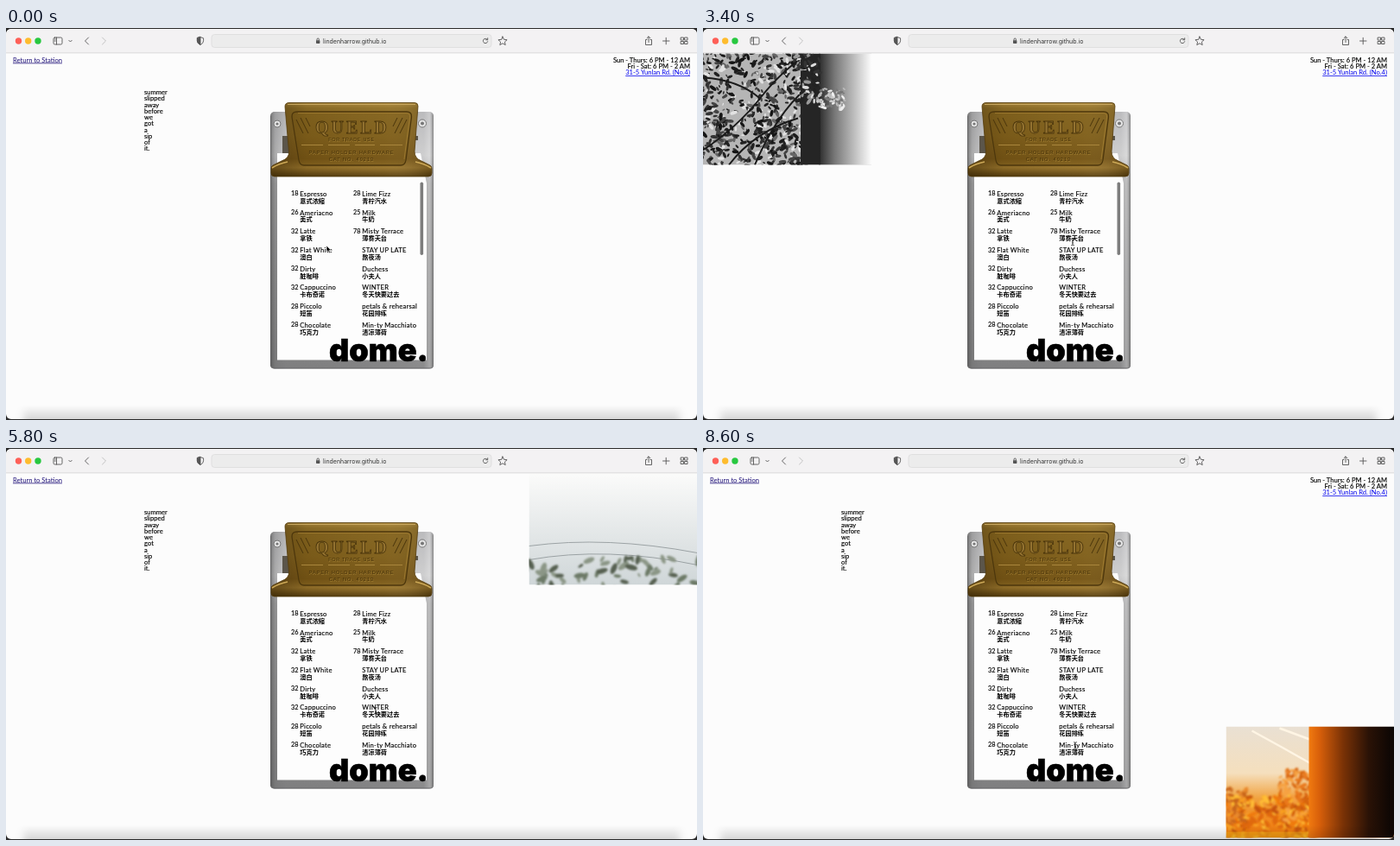
Animation, 800 px wide and 454 px high, one loop 8700 ms. Source, as an HTML page:

```html
<!DOCTYPE html>
<html lang="en">
<head>
<meta charset="utf-8">
<title>Menu</title>
<style>
html, body { margin: 0; width: 100%; height: 100%; overflow: hidden; background: #2a2a2a; }
svg { display: block; width: 100vw; height: 100vh; }
text { font: 7.6px Lato, "Noto Sans CJK SC", "Noto Sans CJK", sans-serif; white-space: pre; stroke: #000; stroke-width: .14; }
.name { letter-spacing: .25px; }
.cn { font: 700 7.2px "Noto Sans CJK SC", "Noto Sans CJK", sans-serif; stroke: none; }
.num { font-size: 7.3px; }
.url { font: 7px Inter, sans-serif; fill: #333; stroke: none; }
.logo { font: 900 36px Inter, sans-serif; stroke-width: .6; }
.end { text-anchor: end; }
.link { text-decoration: underline; stroke: none; }
.icon { fill: none; stroke: #555; stroke-width: .9; stroke-linecap: round; stroke-linejoin: round; }
.stamp text { font-family: "Liberation Sans", sans-serif; text-anchor: middle; stroke: none; }
.stamp .brand { font: bold 20px "Liberation Serif", serif; letter-spacing: 3px; stroke: #4a350b; stroke-width: .8; }
</style>
</head>
<body>
<svg viewBox="0 0 800 454" preserveAspectRatio="none">
  <defs>
    <linearGradient id="floor" x2="0" y2="1"><stop stop-opacity="0"/><stop offset="1" stop-opacity=".16"/></linearGradient>
    <linearGradient id="steel" x2="0" y2="1">
      <stop stop-color="#b4b4b6"/><stop offset=".17" stop-color="#c9c9ca"/><stop offset=".28" stop-color="#a2a2a3"/>
      <stop offset=".6" stop-color="#909091"/><stop offset="1" stop-color="#7f7f80"/>
    </linearGradient>
    <linearGradient id="sheen"><stop stop-color="#444" stop-opacity=".6"/><stop offset=".03" stop-color="#666" stop-opacity=".3"/><stop offset=".1" stop-color="#777" stop-opacity="0"/>
      <stop offset=".94" stop-color="#fff" stop-opacity=".1"/><stop offset=".975" stop-color="#fff" stop-opacity=".3"/><stop offset="1" stop-color="#555" stop-opacity=".6"/>
    </linearGradient>
    <linearGradient id="brass" x2="0" y2="1">
      <stop stop-color="#a8853a"/><stop offset=".08" stop-color="#8d6d26"/><stop offset=".45" stop-color="#866520"/>
      <stop offset=".76" stop-color="#775618"/><stop offset=".88" stop-color="#94712a"/><stop offset="1" stop-color="#523a0c"/>
    </linearGradient>
    <linearGradient id="gloss"><stop stop-color="#2c1d03" stop-opacity=".45"/><stop offset=".22" stop-color="#2c1d03" stop-opacity=".08"/>
      <stop offset=".7" stop-color="#ffe2a0" stop-opacity=".06"/><stop offset="1" stop-color="#2c1d03" stop-opacity=".3"/></linearGradient>
    <linearGradient id="fade"><stop stop-color="#2b2b2b"/><stop offset=".3" stop-color="#777"/><stop offset="1" stop-color="#fcfcfc"/></linearGradient>
    <linearGradient id="haze" x2="0" y2="1"><stop stop-color="#fbfbfa"/><stop offset="1" stop-color="#cfd6d8"/></linearGradient>
    <linearGradient id="shade" x2="1" y2="1"><stop stop-color="#7d8a76"/><stop offset=".5" stop-color="#b9bdb4"/><stop offset="1" stop-color="#4d5648"/></linearGradient>
    <linearGradient id="plaster" x2="0" y2="1"><stop stop-color="#c6cac9"/><stop offset=".6" stop-color="#b3b6b2"/><stop offset="1" stop-color="#8f918a"/></linearGradient>
    <radialGradient id="sun" cx=".72" cy=".52" r=".8"><stop stop-color="#fff"/><stop offset=".2" stop-color="#e6e7ef"/><stop offset=".6" stop-color="#cbcddb"/><stop offset="1" stop-color="#a4a8bd"/></radialGradient>
    <linearGradient id="glow" x2="0" y2="1"><stop stop-color="#e9e0d3"/><stop offset=".42" stop-color="#f5dfbd"/><stop offset=".65" stop-color="#f1a13c"/><stop offset="1" stop-color="#f07508"/></linearGradient>
    <linearGradient id="ember"><stop stop-color="#f07a10"/><stop offset=".12" stop-color="#d9600a"/><stop offset=".4" stop-color="#7a3206"/><stop offset=".7" stop-color="#2a1206"/><stop offset="1" stop-color="#090504"/></linearGradient>
    <filter id="soft"><feGaussianBlur stdDeviation="1.200"/></filter>
    <filter id="spread" x="-5%" width="110%" y="-50%" height="200%"><feGaussianBlur stdDeviation="5 .5"/></filter>
    <clipPath id="paper"><rect x="314" y="172" width="173" height="213"/></clipPath>
    <clipPath id="frame"><rect width="195" height="129"/></clipPath>
    <clipPath id="window"><rect y="1" width="800" height="452" rx="6"/></clipPath>
  </defs>

  <g clip-path="url(#window)">
    <rect width="800" height="454" fill="#fcfcfc"/>
    <g id="page">
      <text class="link" x="8" y="39.5" fill="#1d0f78">Return to Station</text>
      <text class="end" x="792" y="39.5">Sun - Thurs: 6 PM - 12 AM</text>
      <text class="end" x="792" y="46.8">Fri - Sat: 6 PM - 2 AM</text>
      <text class="end link" x="792" y="54" fill="#0000ee">31-5 Yunlan Rd. (No.4)</text>
      <g id="poem"></g>

      <rect x="306" y="97" width="189" height="297.5" rx="5" fill="url(#steel)"/>
      <rect x="306" y="97" width="189" height="297.5" rx="5" fill="url(#sheen)"/>
      <path d="M306.5 102V391q0 3 3 3H492q2.500 0 2.500-3" fill="none" stroke="#5f5f60" stroke-width=".8"/>
      <g fill="#e6e6e6" stroke="#777"><circle cx="314" cy="111" r="4"/><circle cx="482" cy="110.500" r="4.500"/></g>
      <g fill="#777"><circle cx="314" cy="111" r="1.600"/><circle cx="482" cy="110.500" r="2"/></g>
      <path d="M320 125h8v20h-8zM471 125h6v5h-6z" fill="#5b554a"/>
      <path d="M314 145H480L487 180V384.500H314z" fill="#fdfdfd"/>
      <g clip-path="url(#paper)"><g id="menu"></g></g>
      <rect id="thumb" x="479.500" y="178.500" width="3.600" height="84.500" rx="1.800" fill="#7d7d7d"/>

      <path id="clip" d="M328 86.500H473q4 0 4 4L473 143q0 8 8 11l10 5q2 1 2 4v5q0 4-4 4H311q-4 0-4-4v-5q0-3 2-4l10-5q9-3 8.500-11L323 91q0-4.500 5-4.500z" fill="url(#brass)"/>
      <path d="M328 86.500H473q4 0 4 4L473 143q0 8 8 11l10 5q2 1 2 4v5q0 4-4 4H311q-4 0-4-4v-5q0-3 2-4l10-5q9-3 8.500-11L323 91q0-4.500 5-4.500z" fill="url(#gloss)" stroke="#553d0e" stroke-width=".8"/>
      <path d="M326 88.500H474" stroke="#c5a55e" stroke-width="1.200"/>
      <path d="M308 162q8-5 18-7M492 162q-8-5-18-7" fill="none" stroke="#cda957" stroke-width="1.500"/>
      <path d="M337 97H464q6 0 5.500 6L463 153q-1 6-6 6H345q-5 0-6-6L331 103q-.500-6 6-6z" fill="#6b4d10" fill-opacity=".3" stroke="#4d370c" stroke-width="1.300"/>
      <path d="M338 98.500H463q5 0 4.500 5L461 152" fill="none" stroke="#b08a3a" stroke-width=".6"/>
      <g id="stamp" class="stamp"></g>
      <text class="logo end" x="489" y="385.500">dome.</text>
    </g>
    <g id="photos"></g>
    <rect x="20" y="437" width="760" height="18" fill="url(#floor)" filter="url(#spread)"/>

    <rect width="800" height="29" fill="#f3f2f3"/>
    <rect y="28.500" width="800" height=".8" fill="#d4d3d4"/>
    <circle cx="14.500" cy="15" r="3.700" fill="#fe5f57"/><circle cx="25.700" cy="15" r="3.700" fill="#febc2e"/><circle cx="37" cy="15" r="3.700" fill="#28c840"/>
    <rect x="238" y="7.500" width="324" height="15" rx="3.500" fill="#ececec" stroke="#d9d9d9" stroke-width=".7"/>
    <g class="icon">
      <rect x="55" y="11" width="10" height="8" rx="1.500"/><path d="M58.500 11v8M56.300 13h1M56.300 15h1"/>
      <path d="M72.800 14.300l1.700 1.700 1.700-1.700M95.500 11l-4 4 4 4"/><path d="M111.500 11l4 4-4 4" stroke="#bbb"/>
      <path d="M225 10.500l3.600 1.300v3q0 3-3.600 4.700-3.600-1.700-3.600-4.700v-3z"/><path d="M225 10.500v9q-3.600-1.700-3.600-4.700v-3z" fill="#555"/>
      <path d="M557.300 13.400a2.700 2.700 0 1 0 .4 2.300M557.700 11.700v2h-2"/>
      <path d="M575 10l1.500 3.300 3.600.4-2.700 2.400.8 3.500-3.200-1.800-3.200 1.800.8-3.500-2.700-2.400 3.600-.4z"/>
      <path d="M742 13.500h-1.500v6h7v-6H746M744 16.500v-6.500M742 11.800l2-2 2 2M760.500 15h7.500M764.200 11.300v7.500"/>
      <path d="M781.500 11h3v3h-3zM786 11h3v3h-3zM781.500 15.500h3v3h-3zM786 15.500h3v3h-3z"/>
      <path d="M360 14.500v-1.300a1.200 1.200 0 0 1 2.400 0v1.300"/>
    </g>
    <rect x="359" y="14.300" width="4.400" height="3.700" rx=".7" fill="#555"/>
    <text class="url" x="367" y="17.500">lindenharrow.github.io</text>
  </g>
  <g id="cursor" stroke-linejoin="round">
    <path id="arrow" d="M0 0V7.500L1.800 5.900 3 8.800 4.300 8.200 3.100 5.500H5.400z" fill="#000" stroke="#fff" stroke-width=".6"/>
    <path id="beam" d="M-1.800-3.800Q0-3.800 0-2.800V2.800Q0 3.800-1.800 3.800M1.800-3.800Q0-3.800 0-2.800M0 2.800Q0 3.800 1.800 3.800M-1 .9H1" fill="none" stroke="#222" stroke-width=".8"/>
  </g>
</svg>
<script>
const LOOP = 8700, STEP = 100;
const $ = id => document.getElementById(id);
const label = (x, y, s, cls = '') => `<text x="${x}" y="${y}" class="${cls}">${s}</text>`;

$('poem').innerHTML = 'summer slipped away before we got a sip of it.'.split(' ')
  .map((word, i) => label(160, 77.2 + i * 7.22, word)).join('');

// price, name, translation
const left = [[18, 'Espresso', '意式浓缩'], [26, 'Ameriacno', '美式'], [32, 'Latte', '拿铁'], [32, 'Flat White', '澳白'],
  [32, 'Dirty', '脏咖啡'], [32, 'Cappuccino', '卡布奇诺'], [28, 'Piccolo', '短笛'], [28, 'Chocolate', '巧克力']];
const right = [[28, 'Lime Fizz', '青柠汽水'], [25, 'Milk', '牛奶'], [78, 'Misty Terrace', '薄雾天台'], ['', 'STAY UP LATE', '熬夜汤'],
  ['', 'Duchess', '小夫人'], ['', 'WINTER', '冬天快要过去'], ['', 'petals &amp; rehearsal', '花园排练'], ['', 'Min-ty Macchiato', '清凉薄荷']];
const bakery = [[28, 'Pastry', '巧克力起酥'], [12, 'Mini Croissant', '迷你羊角'], [20, "TT's Waffle", '华夫'], [28, 'Seed Sampler', '瓜子拼盘']];
const item = (x, y, [price, name, cn]) =>
  label(x, y - .4, price, 'num') + label(x + 10.3, y, name, 'name') + label(x + 10.3, y + 7.9, cn, 'cn');
const column = (x, y, rows) => rows.map((row, i) => item(x, y + i * 21.7, row)).join('');
$('menu').innerHTML = column(330, 194.8, left) + column(402, 194.8, right) +
  item(330, 418, [28, 'Cinnamon Roll', '肉桂卷']) + label(340.3, 439.6, 'Chocolate', 'name') + column(330, 446.8, bakery);

const emboss = (y, s, size, spacing) => [['#a98638', .6], ['#432f08', 0]].map(([fill, d]) =>
  `<text x="${400 + d}" y="${y + d}" fill="${fill}" style="font-size:${size}px;letter-spacing:${spacing}px">${s}</text>`).join('');
$('stamp').innerHTML = `<g fill="none" stroke="#4a350b">
  <text class="brand" x="401" y="122" fill="#937230">QUELD</text>
  <path d="M336 106l8 16M341 104l9 18M347 104l5 10M464 106l-8 16M459 104l-9 18M453 104l-5 10"/>
  <path d="M342 135.500H367M373 135.500H398M404 135.500H427M433 135.500H459" stroke="#a9863c"/></g>` +
  emboss(131, 'FOR TRADE USE', 5.5, .7) + emboss(146, 'PAPER HOLDER HARDWARE', 5.8, .9) + emboss(154, 'CAT NO. 40213', 5.6, 1);

let seed = 7;
const rnd = () => (seed = seed * 16807 % 2147483647) / 2147483647;
const pick = list => list[rnd() * list.length | 0];
const leaves = (n, x, y, w, h, size, colors) => Array.from({ length: n }, () => {
  const r = size * (.5 + rnd()), cx = x + rnd() * w, cy = y + rnd() * h;
  return `<ellipse rx="${r.toFixed(1)}" ry="${(r * .45).toFixed(1)}" fill="${pick(colors)}" transform="translate(${cx.toFixed(1)} ${cy.toFixed(1)}) rotate(${rnd() * 180 | 0})"/>`;
}).join('');
const rect = (x, y, w, h, fill) => `<rect x="${x}" y="${y}" width="${w}" height="${h}" fill="${fill}"/>`;
const line = (d, color, width) => `<path d="${d}" fill="none" stroke="${color}" stroke-width="${width}"/>`;
const shape = (d, fill) => `<path d="${d}" fill="${fill}"/>`;
const soft = content => `<g filter="url(#soft)">${content}</g>`;
const wires = (n, draw) => Array.from({ length: n }, (_, i) => draw(i)).join('');
const dark = ['#151515', '#222', '#333', '#1c1c1c'];

const trees = () => rect(0, 0, 195, 129, '#b5b5b5') + leaves(620, -5, -5, 125, 139, 3.2, [...dark, '#444', '#666', '#e2e2e2']) +
  line('M0 112Q40 85 66 52T122 0M30 129Q60 90 110 75M66 52Q40 30 0 28M60 129Q85 70 120 40', '#1a1a1a', 2) +
  rect(134, 0, 61, 129, 'url(#fade)') + rect(113, 0, 23, 129, '#252525') + leaves(70, 108, 0, 28, 56, 3, ['#222', '#333', '#999', '#ddd']) +
  leaves(50, 134, 40, 30, 24, 2.6, ['#eee', '#ccc', '#bbb', '#777']);
const alley = () => rect(0, 0, 195, 129, 'url(#shade)') + soft(leaves(90, -5, -5, 80, 80, 6, ['#46543f', '#6c7a60', '#8d9783', '#344030']));
const wall = () => rect(0, 0, 195, 129, 'url(#plaster)') + rect(0, 0, 78, 129, '#8d927c') +
  leaves(300, -4, -4, 84, 62, 3.6, ['#375026', '#4f6b35', '#243a1a', '#71864f', '#d3d8c8']) +
  leaves(260, -4, 50, 56, 66, 3.6, ['#1d2b16', '#2f4222', '#43562f', '#151f10']) +
  shape('M0 112L56 100V129H0z', '#a3a49a') +
  [[51, 12], [51, 42], [50, 72]].map(([x, y]) => rect(x, y, 25, 27, '#b3b2aa') + line(`M${x} ${y}h25v27h-25zM${x + 12} ${y}v27`, '#8d5a46', 1.2)).join('') +
  line('M79 0V129M97 0L101 129', '#858881', 1) + line('M0 8L64 50M0 20L55 62', '#222', 1) +
  shape('M176 0H195V129H184z', '#d3d5d1') + shape('M119 20Q122 4 136 0H177Q182 40 178 78 150 92 131 88 112 74 119 20z', '#5d5b56') +
  wires(9, i => line(`M${124 + i * 6} ${12 - i}Q${119 + i * 6} 50 ${129 + i * 6} 84`, i % 3 ? '#716c65' : '#75574a', 1.1)) +
  shape('M52 129Q54 102 68 102T84 129z', '#6d6e65') + shape('M80 129Q84 108 93 108T103 129z', '#393a36') +
  line('M113 80L119 129', '#d5d6d0', 6) + line('M70 96Q95 112 128 88T178 78', '#404039', 1.1) + line('M78 92Q100 100 130 92', '#648062', 1.3);
const sky = () => rect(0, 0, 195, 129, 'url(#haze)') + line('M0 84Q90 72 195 92M0 100Q90 84 195 106', '#8b9295', .8) +
  soft(leaves(55, -4, 98, 203, 35, 5, ['#6d7a68', '#8b9686', '#566151']));
const cables = () => rect(0, 0, 195, 126.5, 'url(#sun)') +
  wires(8, i => line(`M${i * 12 - 20} ${50 - i * 7}L195 ${118 - i * 11}`, '#80849a', .5)) +
  line('M0 125Q80 84 152 54T195 26', '#14141b', 3.6) + line('M0 127Q90 78 195 20', '#33333c', 1) +
  line('M119 0Q136 36 152 54T195 92', '#1b1b22', 3) + line('M122 0Q150 44 195 61', '#444', 1) + line('M130 35L152 12 160 42', '#777', .6) +
  leaves(110, -4, -4, 42, 21, 2.8, dark) + leaves(34, 32, -3, 32, 9, 2.4, dark) + leaves(34, -3, 10, 18, 24, 2.4, dark) +
  leaves(64, 179, 84, 18, 44, 2.6, dark) + leaves(20, 145, 114, 48, 14, 2, dark);
const sunset = () => rect(0, 0, 195, 129, 'url(#glow)') + line('M30 5Q65 24 100 44M62 2L105 18', '#fff5e4', 2.5) +
  soft(leaves(240, -4, 80, 108, 52, 4, ['#ef7a0b', '#e0690b', '#f9a020', '#c65408', '#ffbd34']) +
    leaves(110, 62, 50, 38, 60, 3.4, ['#e9781a', '#f6a243', '#d66410']) + leaves(70, -4, 72, 28, 40, 3, ['#c8651a', '#e98a2d'])) +
  rect(96, 0, 99, 129, 'url(#ember)') + rect(0, 122, 95, 7, '#ffca1c66');

// x, y, height, picture, shown from, shown until
const photos = [[0, 29.5, 129, trees, 3000, 3700], [0, 179, 126.5, alley, 3800, 4500], [0, 322.5, 129, wall, 4700, 5600],
  [605.5, 29.5, 129, sky, 5800, 6400], [605.5, 179, 126.5, cables, 6500, 7300], [605.5, 322.5, 129, sunset, 7600, LOOP]];
$('photos').innerHTML = photos.map(([x, y, h, draw]) =>
  `<g transform="translate(${x} ${y})"><svg style="width:194.5px;height:${h}px"><g clip-path="url(#frame)">${draw()}</g></svg></g>`).join('');
const frames = [...$('photos').children];

const scrollKeys = [[100, 0], [800, 161], [1300, 161], [1900, 0]];
const thumbKeys = [[5400, 1], [5800, 0]];
const cursorKeys = [[2400, 371, 252], [3000, 428, 243], [3400, 428, 248], [3700, 428, 251], [3900, 428, 262], [4500, 428, 266],
  [4800, 428, 285], [4900, 428, 287], [5500, 428, 290], [5800, 428, 304], [6300, 429, 308], [6500, 429, 320], [6900, 429, 322],
  [7300, 429, 325], [7600, 430, 342], [8600, 431, 344.5]];
const ease = u => u * u * (3 - 2 * u);
function along(keys, t) {
  const i = keys.findIndex(k => k[0] > t);
  if (i < 0) return keys[keys.length - 1].slice(1);
  if (i === 0) return keys[0].slice(1);
  const a = keys[i - 1], b = keys[i], u = ease((t - a[0]) / (b[0] - a[0]));
  return a.slice(1).map((v, j) => v + (b[j + 1] - v) * u);
}
const move = (el, x, y) => el.setAttribute('transform', `translate(${x} ${y})`);

function render(now) {
  const t = Math.floor(now % LOOP / STEP) * STEP;
  const [scroll] = along(scrollKeys, t), [x, y] = along(cursorKeys, t);
  const bounce = t >= 1900 && t < 2700 ? 5 * Math.exp((1900 - t) / 210) : 0;
  const overText = t >= 500 && t < 1500 || t >= 2800;
  move($('page'), 0, bounce);
  move($('menu'), 0, -scroll);
  move($('thumb'), 0, scroll * .472);
  $('thumb').style.opacity = along(thumbKeys, t)[0];
  move($('cursor'), x, y);
  $('arrow').style.display = overText ? 'none' : '';
  $('beam').style.display = overText ? '' : 'none';
  photos.forEach(([, , , , from, to], i) => frames[i].style.display = t >= from && t < to ? '' : 'none');
}
const start = performance.now();
(function tick() {
  render(performance.now() - start);
  requestAnimationFrame(tick);
})();
</script>
</body>
</html>
```
